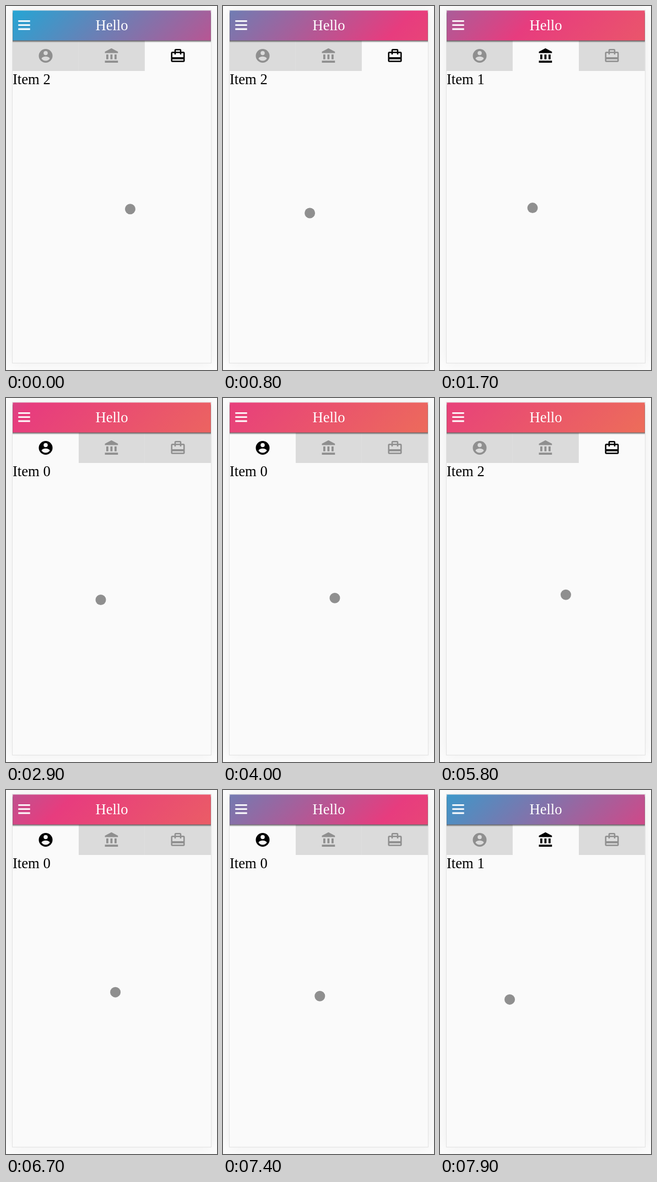
Write an HTML page that moves like this. It is 383 px wide and 661 px high and loops after 8000 ms.

```html
<!DOCTYPE html>
<html lang="en">
<head>
<meta charset="utf-8">
<title>Swipe tabs</title>
<style>
  html, body { margin: 0; width: 100%; height: 100%; overflow: hidden; background: #fcfcfc; }
  svg { display: block; width: 383px; height: 661px; }
  text { font: 26.6px "Liberation Serif", "Times New Roman", serif; }
  .tab { --back: #dbdbdb; --ink: #8f8f8f; fill: var(--ink); }
  .tab.on { --back: #fafafa; --ink: #000; }
  .back { fill: var(--back); }
  .line { fill: none; stroke: var(--ink); stroke-width: 2; }
</style>
</head>
<body>
<svg viewBox="0 0 383 661">
  <defs>
    <linearGradient id="sky" gradientUnits="userSpaceOnUse" x1="1135" y1="525" x2="305" y2="-305">
      <stop offset="0" stop-color="#ee7752"/>
      <stop offset=".3333" stop-color="#e73c7e"/>
      <stop offset=".6667" stop-color="#23a6d5"/>
      <stop offset="1" stop-color="#23d5ab"/>
    </linearGradient>
    <filter id="glow" x="-20%" y="-20%" width="140%" height="140%"><feGaussianBlur stdDeviation="12"/></filter>
    <filter id="soft" x="-5%" y="-50%" width="110%" height="200%"><feGaussianBlur stdDeviation="1.2"/></filter>
    <clipPath id="card"><rect x="12" y="8" width="360" height="640"/></clipPath>
  </defs>
  <rect width="383" height="661" fill="#fcfcfc"/>
  <rect x="12" y="8" width="360" height="640" opacity=".06" filter="url(#glow)"/>
  <rect x="11" y="7" width="362" height="642" fill="#e2e2e2"/>
  <rect x="12" y="8" width="360" height="640" fill="#fafafa"/>
  <g clip-path="url(#card)">
    <g id="tabs"></g>
    <rect x="10" y="12" width="364" height="52.5" opacity=".6" filter="url(#soft)"/>
    <rect x="12.3" y="8.3" width="359.4" height="54.3" fill="url(#sky)"/>
    <path d="M22.3 27.4h21.4m0 7.3H22.3m0 7.3h21.4" stroke="#fff" stroke-width="2.8"/>
    <text x="192" y="44.3" text-anchor="middle" fill="#fff">Hello</text>
    <text id="item" x="12" y="142.3"></text>
  </g>
  <circle id="dot" r="9.5" fill="#8f8f8f"/>
</svg>
<script>
const LOOP = 8000, STEP = 100;
const HALF = 7700, TURN = 5660; // gradient sweep length and the time it turns back
const RIGHT = 235, LEFT = 120;  // ends of a swipe

const $ = id => document.getElementById(id);
const sky = $('sky'), item = $('item'), dot = $('dot');

const person = `<circle cx="12" cy="12" r="10"/><circle class="back" cx="12" cy="8" r="3"/>
  <path class="back" d="M6 16c0-2 4-3.1 6-3.1s6 1.1 6 3.1q-2.2 3.2-6 3.2T6 16"/>`;
const bank = '<path d="M2 8V6l9.5-5L21 6v2zM2 19h19v3H2z"/>' +
  [4, 10, 16].map(x => `<rect x="${x}" y="10" width="3" height="7"/>`).join('');
const bag = `<rect class="line" x="3" y="7" width="18" height="13" rx="1"/>
  <path class="line" d="M8 10V4q0-1 1-1h6q1 0 1 1v6"/><rect x="3" y="14" width="18" height="3"/>`;

$('tabs').innerHTML = [person, bank, bag].map((icon, i) => `<g>
  <rect class="back" x="${12 + 120 * i}" y="63" width="119.9" height="55"/>
  <g transform="translate(${57 + 120 * i} 75.5) scale(1.25)">${icon}</g></g>`).join('');
const tabs = [...$('tabs').children];

// Turns of the finger, right and left in alternation: time, y, tab chosen there
const turns = [
  [-130, 367, 2], [550, 382], [1200, 362, 1], [2100, 369], [2500, 360, 0],
  [3250, 371], [3750, 358], [4450, 375, 1], [5170, 350], [5500, 368, 2],
  [5857, 356], [6250, 368, 0], [6980, 366], [7800, 381, 1], [8480, 360]
].map(([t, y, tab], i) => ({ t, y, tab, x: i % 2 ? LEFT : RIGHT }));

const mix = (a, b, w) => a + (b - a) * w;

// CSS "ease"
function ease(x) {
  const bez = (a, b, s) => 3 * a * s * (1 - s) ** 2 + 3 * b * s * s * (1 - s) + s ** 3;
  let lo = 0, hi = 1;
  for (let i = 0; i < 24; i++) {
    const mid = (lo + hi) / 2;
    if (bez(.25, .25, mid) < x) lo = mid; else hi = mid;
  }
  return bez(.1, 1, lo);
}

function draw(t) {
  const u = (t - TURN) / HALF;
  const p = u < 0 ? ease(1 + u) : 1 - ease(u);
  sky.setAttribute('gradientTransform', `translate(${12 - 1080 * p} -74.5)`);

  const past = turns.filter(k => k.t <= t);
  const a = past[past.length - 1], b = turns[past.length];
  const w = (1 - Math.cos(Math.PI * (t - a.t) / (b.t - a.t))) / 2;
  dot.setAttribute('cx', mix(a.x, b.x, w) + .5);
  dot.setAttribute('cy', mix(a.y, b.y, w) + .5);

  const { tab } = past.filter(k => k.tab !== undefined).pop();
  item.textContent = 'Item ' + tab;
  tabs.forEach((g, i) => g.setAttribute('class', i === tab ? 'tab on' : 'tab'));
}

const start = performance.now();
function tick() {
  const t = (performance.now() - start) % LOOP;
  draw(Math.floor(t / STEP) * STEP);
  requestAnimationFrame(tick);
}
tick();
</script>
</body>
</html>
```
